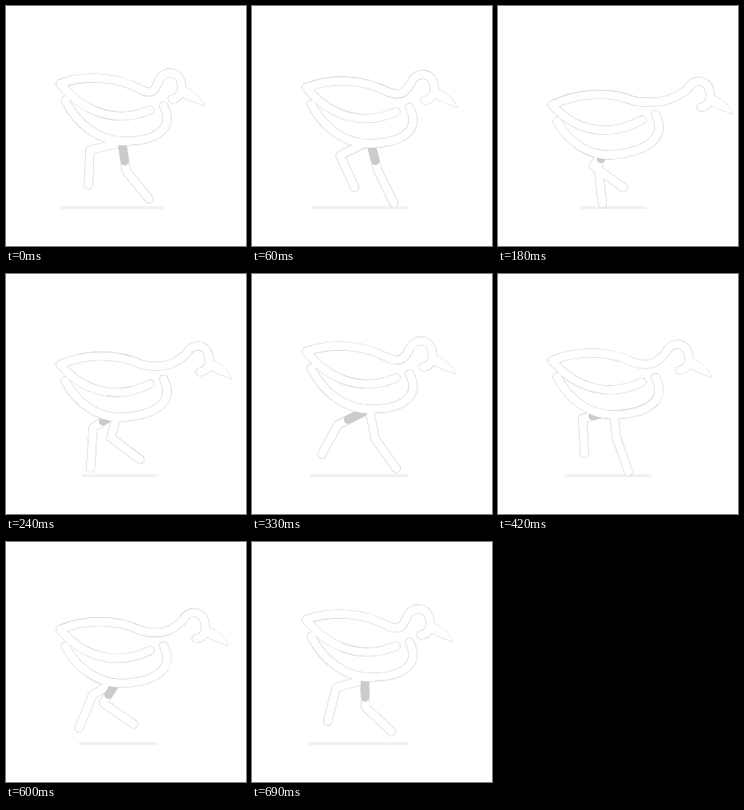
An HTML page with a canvas that plays this animation: 300x300 px, repeating every 720 ms.

```html
<!DOCTYPE html>
<html lang="en">
<head>
<meta charset="utf-8">
<title>Walking bird</title>
<style>
  html, body { margin: 0; width: 100%; height: 100%; overflow: hidden; background: #fff; }
  canvas { display: block; width: 300px; height: 300px; }
</style>
</head>
<body>
<canvas id="stage" width="300" height="300"></canvas>
<script>
const ctx = document.getElementById('stage').getContext('2d');
const LOOP = 720, STEP = 30;
const WHITE = '#fff', EDGE = '#b0b0b0', SHADE = '#cbcbcb', GROUND = '#f2f2f2';
const INNER = 10.3, OUTER = 11;
const HEAD_REACH = 46, HIP_Y = 172, THIGH = 22.5;
const SECOND_BOB = 345, FAR_LEG_LEAD = 315;

// Bezier points: x, y and how far the point follows the head (0 to 1)
const BACK = [
  [68, 97], [95, 87], [135, 86], [170, 105],
  [184, 112, .45], [187, 104, .75], [191, 93, 1],
  [198, 79, 1], [216, 81, 1], [219, 96, 1],
  [222, 110, 1], [214, 116, 1], [208, 116, 1]
];
const WING = [[68, 97], [91, 127], [132, 150], [180, 130]];
const BELLY = [[74, 118], [88, 146], [115, 169], [148, 169], [185, 169], [212, 155], [197, 125]];
const BEAK = [[224, 102, 1], [241, 108, 1], [248, 125, 1], [234, 120, 1], [219, 113, 1]];

// One stride in eight even beats: knee x, knee y, foot x, foot y
const STRIDE = [
  [105, 180, 103, 224], [113, 191, 140, 228], [119, 200, 157, 227], [138, 206, 172, 235],
  [158, 206, 180, 246], [140, 203, 151, 247], [111, 193, 111, 245], [108, 190, 87, 227]
];

// Eases from 0 to 1 between two times
function ease(t, start, end) {
  const u = Math.min(1, Math.max(0, (t - start) / (end - start)));
  return (1 - Math.cos(Math.PI * u)) / 2;
}

function bob(t, end) {
  const phase = t < SECOND_BOB ? t : t - SECOND_BOB;
  return ease(phase, 35, 125) - ease(phase, 170, end);
}

// Closed Catmull-Rom curve through the stride
function leg(t) {
  const n = STRIDE.length, beat = t / LOOP * n, i = Math.floor(beat), u = beat - i;
  const [a, b, c, d] = [-1, 0, 1, 2].map(k => STRIDE[(i + k + n) % n]);
  const [kx, ky, fx, fy] = b.map((v, k) =>
    v + u / 2 * (c[k] - a[k] + u * (2 * a[k] - 5 * v + 4 * c[k] - d[k] + u * (3 * (v - c[k]) + d[k] - a[k]))));
  return [[140 + Math.max(0, kx - 140) / 2, HIP_Y], [kx, ky], [fx, fy]];
}

function curve(points) {
  const path = new Path2D();
  path.moveTo(...points[0]);
  for (let i = 1; i < points.length; i += 3)
    path.bezierCurveTo(...points[i], ...points[i + 1], ...points[i + 2]);
  return path;
}

function polyline(...points) {
  const path = new Path2D();
  points.forEach(p => path.lineTo(...p));
  return path;
}

function stroke(paths, color, width) {
  ctx.strokeStyle = color;
  ctx.lineWidth = width;
  paths.forEach(p => ctx.stroke(p));
}

function draw(t) {
  const reach = bob(t, 380), dip = bob(t, 330);
  // The body dips most at the tail, and the head slides forward
  const pose = points => points.map(([x, y, pull = 0]) => [
    x + HEAD_REACH * pull * reach,
    y + Math.max(10.5, 27 - (x - 68) * .128) * dip
  ]);

  const belly = curve(pose(BELLY));
  const body = [curve(pose(BACK)), curve(pose(WING)), belly];
  const far = leg((t + FAR_LEG_LEAD) % LOOP);
  const legs = [polyline(...far), polyline(...leg(t))];
  const [[hx, hy], [kx, ky]] = far;
  const k = THIGH / Math.hypot(kx - hx, ky - hy);
  const thigh = polyline([hx, hy], [hx + (kx - hx) * k, hy + (ky - hy) * k]);
  const [top, topBend, tip, lowBend, low] = pose(BEAK);
  const beak = new Path2D();
  beak.moveTo(...top);
  beak.quadraticCurveTo(...topBend, ...tip);
  beak.quadraticCurveTo(...lowBend, ...low);

  ctx.fillStyle = WHITE;
  ctx.fillRect(0, 0, 300, 300);
  ctx.lineCap = ctx.lineJoin = 'round';
  stroke([polyline([70 + 35 * reach, 252], [195 - 11 * reach, 252])], GROUND, 4);

  stroke([...body, ...legs], EDGE, OUTER);
  stroke([beak], EDGE, OUTER - INNER);
  stroke(legs, WHITE, INNER);
  stroke([thigh], SHADE, INNER);

  // The belly hides the tops of the legs
  ctx.save();
  ctx.clip(belly);
  ctx.fill(belly);
  stroke(body, EDGE, OUTER);
  ctx.restore();

  stroke(body, WHITE, INNER);
  ctx.fill(beak);
}

function tick() {
  draw(Math.floor(performance.now() % LOOP / STEP) * STEP);
  requestAnimationFrame(tick);
}
tick();
</script>
</body>
</html>
```
